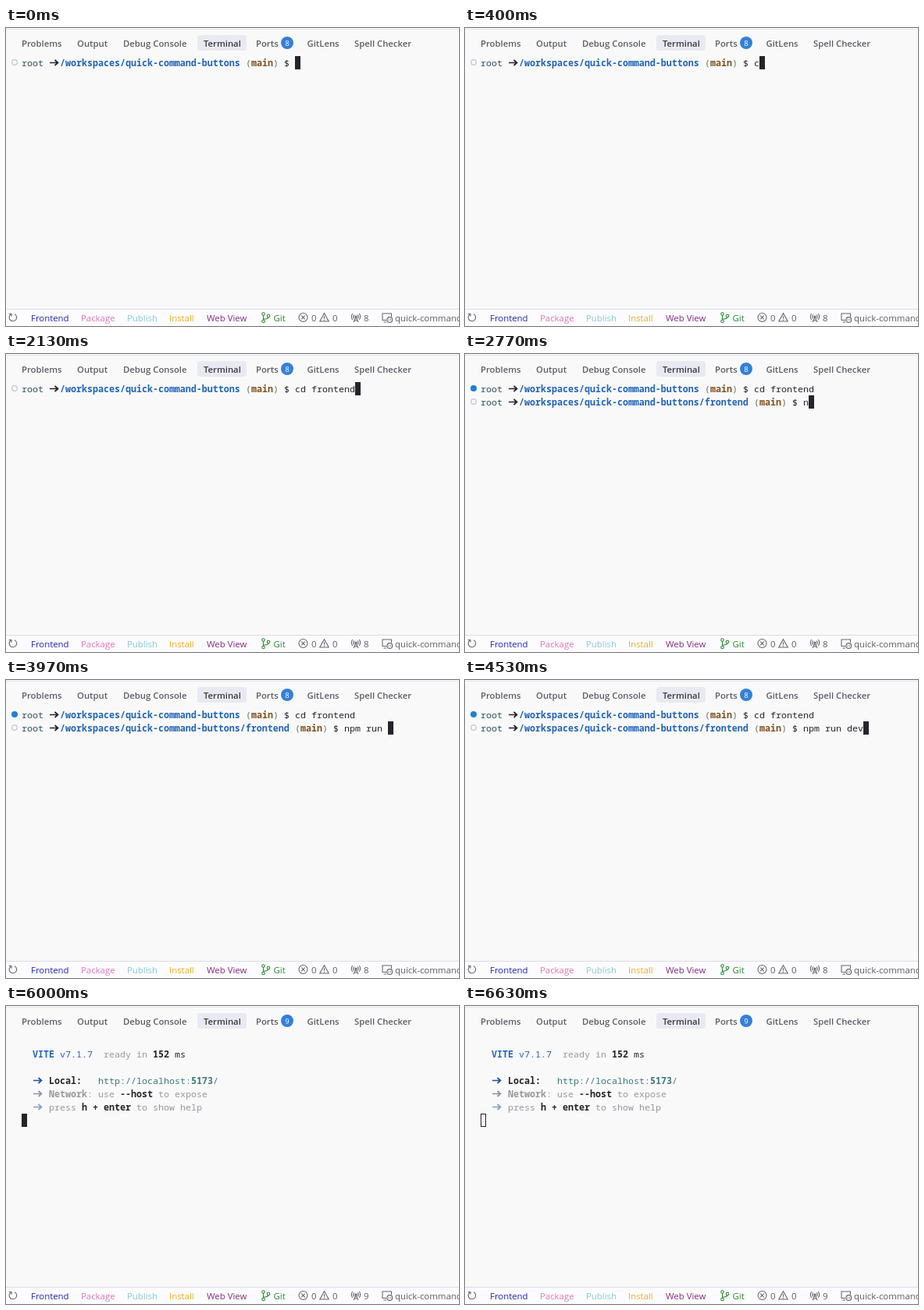
Write an HTML page that moves like this. It is 580 px wide and 382 px high and loops after 6830 ms.

```html
<!DOCTYPE html>
<html lang="en">
<head>
<meta charset="utf-8">
<style>
  html, body { margin: 0; width: 100%; height: 100%; overflow: hidden; background: #f9f9fa; }
  svg { display: block; }
  .ui { font: 500 11.4px "Open Sans", "Noto Sans", sans-serif; }
  .tabs { font-weight: 600; font-size: 11.3px; }
  .mono { font: 11.667px "Noto Sans Mono", monospace; }
  .bold { font-weight: 600; }
  .icon { fill: none; stroke: #666670; stroke-width: 1.1; }
</style>
</head>
<body>
<svg width="580" height="382" viewBox="0 0 580 382">
  <rect width="580" height="382" fill="#f9f9fa"/>
  <path d="M0 1.5H580" stroke="#e4e4ec"/>
  <rect y="360" width="580" height="22" fill="#fcfcfe"/>
  <path d="M0 360.5H580" stroke="#dcdce4"/>
  <rect x="245" y="9" width="63" height="20" rx="4" fill="#e9e9f2"/>
  <g id="tabs" class="ui tabs"></g>
  <circle cx="360" cy="19" r="8" fill="#3480d8"/>
  <text id="badge" class="ui" x="360" y="22.5" text-anchor="middle" fill="#fff" style="font-size:9.5px"></text>
  <g id="status" class="ui"></g>
  <g class="icon">
    <path d="M6 367.2A4.8 4.8 0 1 0 11 366.7M3.8 366.5H7V369.7"/>
    <g stroke="#2c8a30">
      <circle cx="329.5" cy="366.5" r="1.8"/><circle cx="329.5" cy="376" r="1.8"/><circle cx="336" cy="369" r="1.8"/>
      <path d="M329.5 368.3V374.2M336 370.8Q335.5 373 329.5 373"/>
    </g>
    <circle cx="380.5" cy="371" r="5.5"/>
    <path d="M378.3 368.7L382.7 373.3M382.7 368.7L378.3 373.3"/>
    <path d="M407.5 365.7L413.2 376H401.8ZM407.5 369.2V372.7M407.5 373.7V374.9"/>
    <path d="M448 371L445 377M448 371L451 377M446 375H450M445.7 367.5Q444 370 445.7 372.5M450.3 367.5Q452 370 450.3 372.5M443.7 366Q441 370 443.7 374M452.3 366Q455 370 452.3 374"/>
    <circle cx="448" cy="370" r="1" fill="#666670"/>
    <path d="M487 374.5H482V366H493.5V370M483.5 377H487"/>
    <circle cx="491.3" cy="374" r="3.4"/>
    <path d="M489.5 373L490.7 374L489.5 375.2M493.2 373L492 374L493.2 375.2" stroke-width=".8"/>
  </g>
  <g id="terminal" class="mono"></g>
</svg>
<script>
const LOOP = 6830;
const ENTER_CD = 2400, ENTER_NPM = 4650, READY = 4850, BADGE = 5130, COUNT = 5200, BLUR = 6300;
const INK = '#24242c', BLUE = '#2264b8', TEAL = '#3c7c74', GREY = '#98989e', UI_GREY = '#5c5c64';
const $ = id => document.getElementById(id);
const label = (x, y, text, fill) => `<text x="${x}" y="${y}" fill="${fill}">${text}</text>`;

$('tabs').innerHTML = [[20, 'Problems'], [91, 'Output'], [150, 'Debug Console'], [253, 'Terminal', '#383840'],
  [320, 'Ports'], [385.5, 'GitLens'], [446, 'Spell Checker']]
  .map(([x, text, fill = UI_GREY]) => label(x, 23.5, text, fill)).join('');

const statusItems = [[32, 'Frontend', '#2424bc'], [96, 'Package', '#e874b8'], [155, 'Publish', '#84c8d4'],
  [209, 'Install', '#eeac24'], [257, 'Web View', '#882c80'], [342.5, 'Git', '#2c8a30'],
  [391, '0', UI_GREY], [418, '0', UI_GREY], [498, 'quick-command-buttons', UI_GREY]];

// Key presses as [character, time]
const keys = (text, times) => [...text].map((char, i) => [char, times[i]]);
const cdKeys = keys('cd frontend', [400, 530, 660, 1000, 1130, 1240, 1340, 1520, 1680, 1870, 2070]);
const npmKeys = keys('npm run dev', [2770, 2930, 3000, 3200, 3630, 3670, 3730, 3930, 4130, 4270, 4430]);
const typed = (list, t) => list.filter(key => t >= key[1]).map(key => key[0]).join('');

const colX = col => 20 + col * 7;
const midY = row => 44.5 + row * 17;

function put(row, col, text, fill = INK, bold = false) {
  return `<text x="${colX(col)}" y="${49 + row * 17}" fill="${fill}"${bold ? ' class="bold"' : ''}>${text}</text>`;
}

function arrow(row, col, color = INK) {
  return `<path d="M${colX(col) + 1} ${midY(row)}h10.5m-4 -3.5l4 3.5l-4 3.5" fill="none" stroke="${color}" stroke-width="1.7"/>`;
}

function cursor(row, col, hollow) {
  const x = colX(col), y = 36 + row * 17;
  return hollow
    ? `<rect x="${x + .5}" y="${y + .5}" width="6" height="16" fill="none" stroke="${INK}"/>`
    : `<rect x="${x}" y="${y}" width="7" height="17" fill="${INK}"/>`;
}

function prompt(row, path, command, done, active) {
  const end = 7 + path.length;
  const dot = done ? 'r="4" fill="#2080d0"' : 'r="3.3" fill="none" stroke="#c4c4d0" stroke-width="1.2"';
  return `<circle cx="11" cy="${midY(row) - .5}" ${dot}/>`
    + put(row, 0, 'root', '#2c5060') + arrow(row, 5) + put(row, 7, path, BLUE, true)
    + put(row, end + 1, '(', '#60786c') + put(row, end + 2, 'main', '#80501c', true)
    + put(row, end + 6, ')', '#60786c') + put(row, end + 8, '$') + put(row, end + 10, command)
    + (active ? cursor(row, end + 10 + command.length) : '');
}

function serverOutput(blurred) {
  return put(1, 2, 'VITE', BLUE, true) + put(1, 7, 'v7.1.7', BLUE)
    + put(1, 15, 'ready in', GREY) + put(1, 24, '152', INK, true) + put(1, 28, 'ms')
    + arrow(3, 2, '#2054a8') + put(3, 5, 'Local:', INK, true)
    + put(3, 14, 'http://localhost:', TEAL) + put(3, 31, '5173', TEAL, true) + put(3, 35, '/', TEAL)
    + arrow(4, 2, '#8c94a8') + put(4, 5, 'Network', GREY, true) + put(4, 12, ': use', GREY)
    + put(4, 18, '--host', INK, true) + put(4, 25, 'to expose', GREY)
    + arrow(5, 2, '#80a4cc') + put(5, 5, 'press', GREY) + put(5, 11, 'h + enter', INK, true)
    + put(5, 21, 'to show help', GREY)
    + cursor(6, 0, blurred);
}

function terminal(t) {
  if (t >= READY) return serverOutput(t >= BLUR);
  const path = '/workspaces/quick-command-buttons';
  const entered = t >= ENTER_CD, running = t >= ENTER_NPM;
  let view = prompt(0, path, typed(cdKeys, t), entered, !entered);
  if (entered) view += prompt(1, path + '/frontend', typed(npmKeys, t), false, !running);
  return running ? view + cursor(2, 0) : view;
}

const shown = {};
function update(id, markup) {
  if (shown[id] !== markup) $(id).innerHTML = shown[id] = markup;
}

function render(now) {
  const t = now % LOOP;
  update('terminal', terminal(t));
  update('badge', t < BADGE ? '8' : '9');
  update('status', [...statusItems, [458, t < COUNT ? '8' : '9', UI_GREY]]
    .map(([x, text, fill]) => label(x, 375.5, text, fill)).join(''));
}

const start = performance.now();
function tick() {
  render(performance.now() - start);
  requestAnimationFrame(tick);
}
tick();
</script>
</body>
</html>
```
